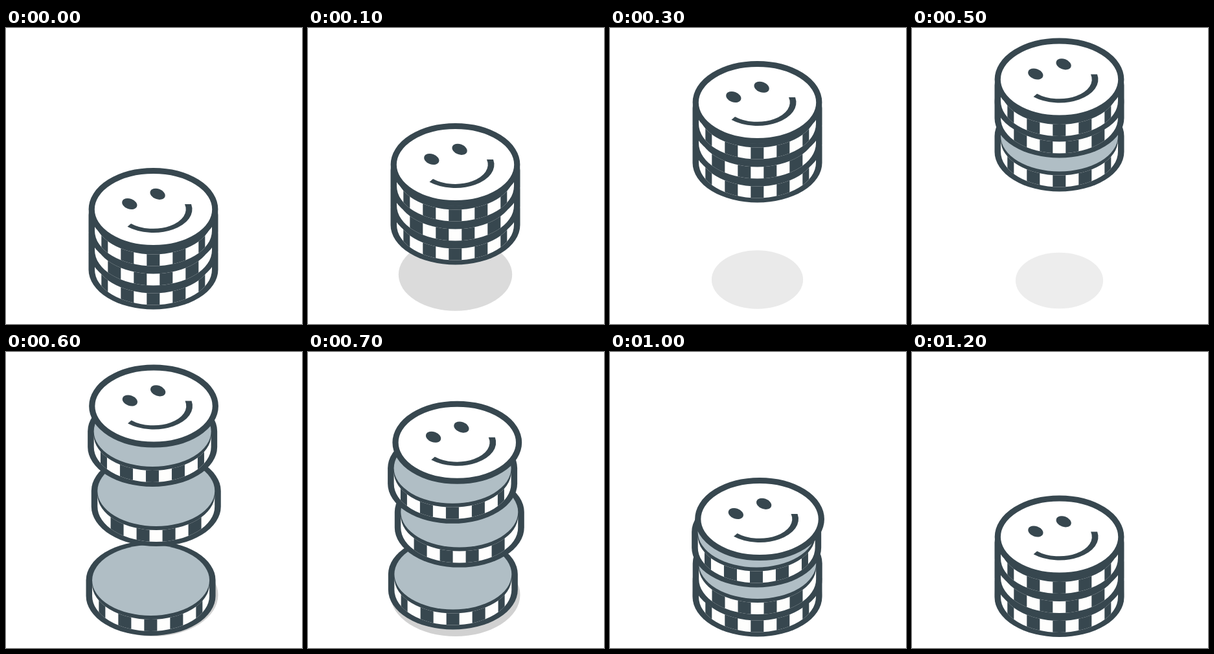
Animation, 457 px wide and 457 px high, one loop 1900 ms. Source, as an HTML page:

```html
<!DOCTYPE html>
<html lang="en">
<head>
<meta charset="utf-8">
<title>Bouncing coin stack</title>
<style>
  html, body { margin: 0; width: 100%; height: 100%; overflow: hidden; background: #fff; }
  svg { display: block; width: 100%; height: 100%; }
  .ink { fill: #37474f; }
  .face { fill: #b0bec5; }
  .wall { fill: #fefefd; }
</style>
</head>
<body>
<svg viewBox="0 0 457 457">
  <defs>
    <clipPath id="rim">
      <path d="M-90.5 6A90.5 54.5 0 0 0 90.5 6V24A90.5 54.5 0 0 1 -90.5 24Z"/>
    </clipPath>
    <g id="body">
      <path class="ink" d="M-100 0A100 61 0 0 1 100 0V24A100 61.5 0 0 1 -100 24Z"/>
      <ellipse class="face" rx="90.5" ry="54.5"/>
      <rect class="wall" x="-92" width="184" height="82" clip-path="url(#rim)"/>
    </g>
  </defs>
  <ellipse id="shadow" cx="227.5"/>
  <g id="coins"></g>
  <g id="lid">
    <ellipse rx="95.3" ry="59.5" fill="#fff" stroke="#37474f" stroke-width="9.2"/>
    <ellipse class="ink" rx="12" ry="8" transform="translate(-36.7 -8.5) rotate(20)"/>
    <ellipse class="ink" rx="12" ry="8" transform="translate(6.6 -23.7) rotate(20)"/>
    <path class="ink" d="M-40 26.8A60 36 0 0 0 58.5 -8H48.5A50.5 30 0 0 1 -34.5 21.9Z"/>
  </g>
</svg>
<script>
const STEP = 100, LOOP = 1900, LAST = 12;
const CENTER = 227.5, APEX = 5, TOP = 200.5, FLOOR = -5.5;

const SVG = "http://www.w3.org/2000/svg";
const el = (name, attrs, parent) => {
  const node = parent.appendChild(document.createElementNS(SVG, name));
  return set(node, attrs);
};
const set = (node, attrs) => {
  for (const key in attrs) node.setAttribute(key, attrs[key]);
  return node;
};

const shadow = document.getElementById("shadow");
const holder = document.getElementById("coins");

// Dark bars around the wall; the outermost ones look narrower.
function makeCoin(bars) {
  const coin = el("g", {}, holder);
  el("use", { href: "#body" }, coin);
  const rim = el("g", { class: "ink", "clip-path": "url(#rim)" }, coin);
  for (const x of bars) {
    const width = Math.abs(x) > 70 ? 10 : 20;
    el("rect", { x: x - width / 2 - 0.2, width, height: 82 }, rim);
  }
  return coin;
}

const outerBars = [-75, -40, 0, 40, 75];
const middleBars = [-60, -20, 20, 60];
const bottom = makeCoin(outerBars);
const middle = makeCoin(middleBars);
const upper = makeCoin(outerBars);
const lid = document.getElementById("lid");

// rest: y on the ground; sway, peak: size and step of the sideways drift;
// heights: height above rest at the key steps of the fall.
const KEYS = [5, 6, 8, 10, LAST];
const parts = [
  { node: lid, rest: 280, sway: 7.6, peak: 8.6, heights: [TOP, 196.5, 48, 22, FLOOR] },
  { node: upper, rest: 289, sway: -6.5, peak: 8, heights: [TOP, 166.5, 16.5, 11, FLOOR] },
  { node: middle, rest: 319, sway: 6.3, peak: 7, heights: [204, 104.5, 18.5, -7.5, FLOOR] },
  { node: bottom, rest: 349, sway: -4.2, peak: 6.4, heights: [182, -3.5, 21.5, -5, FLOOR] }
];

function heightAt(part, step) {
  if (step < APEX) return TOP * (1 - (1 - step / APEX) ** 1.89);
  const k = Math.max(1, KEYS.findIndex(key => key >= step));
  const u = (step - KEYS[k - 1]) / (KEYS[k] - KEYS[k - 1]);
  const [from, to] = [part.heights[k - 1], part.heights[k]];
  return from + (to - from) * u ** 1.4;
}

function driftAt(part, step) {
  return step > APEX ? part.sway * Math.exp(-(((step - part.peak) / 1.6) ** 2)) : 0;
}

function drawShadow(step) {
  const shrink = step <= APEX ? heightAt(parts[3], step) * 0.00178 : 0;
  const grey = Math.round(209 + 85 * shrink);
  set(shadow, {
    visibility: step ? "visible" : "hidden",
    cy: 375 + 46 * shrink,
    rx: 100 * (1 - shrink),
    ry: 64 * (1 - shrink),
    fill: `rgb(${grey},${grey},${grey})`
  });
}

function draw(time) {
  const step = Math.min(LAST, Math.floor((time % LOOP) / STEP));
  for (const part of parts) {
    const x = CENTER + driftAt(part, step);
    const y = part.rest - heightAt(part, step);
    set(part.node, { transform: `translate(${x} ${y})` });
  }
  drawShadow(step);
}

const start = performance.now();
function tick() {
  draw(performance.now() - start);
  requestAnimationFrame(tick);
}
tick();
</script>
</body>
</html>
```
